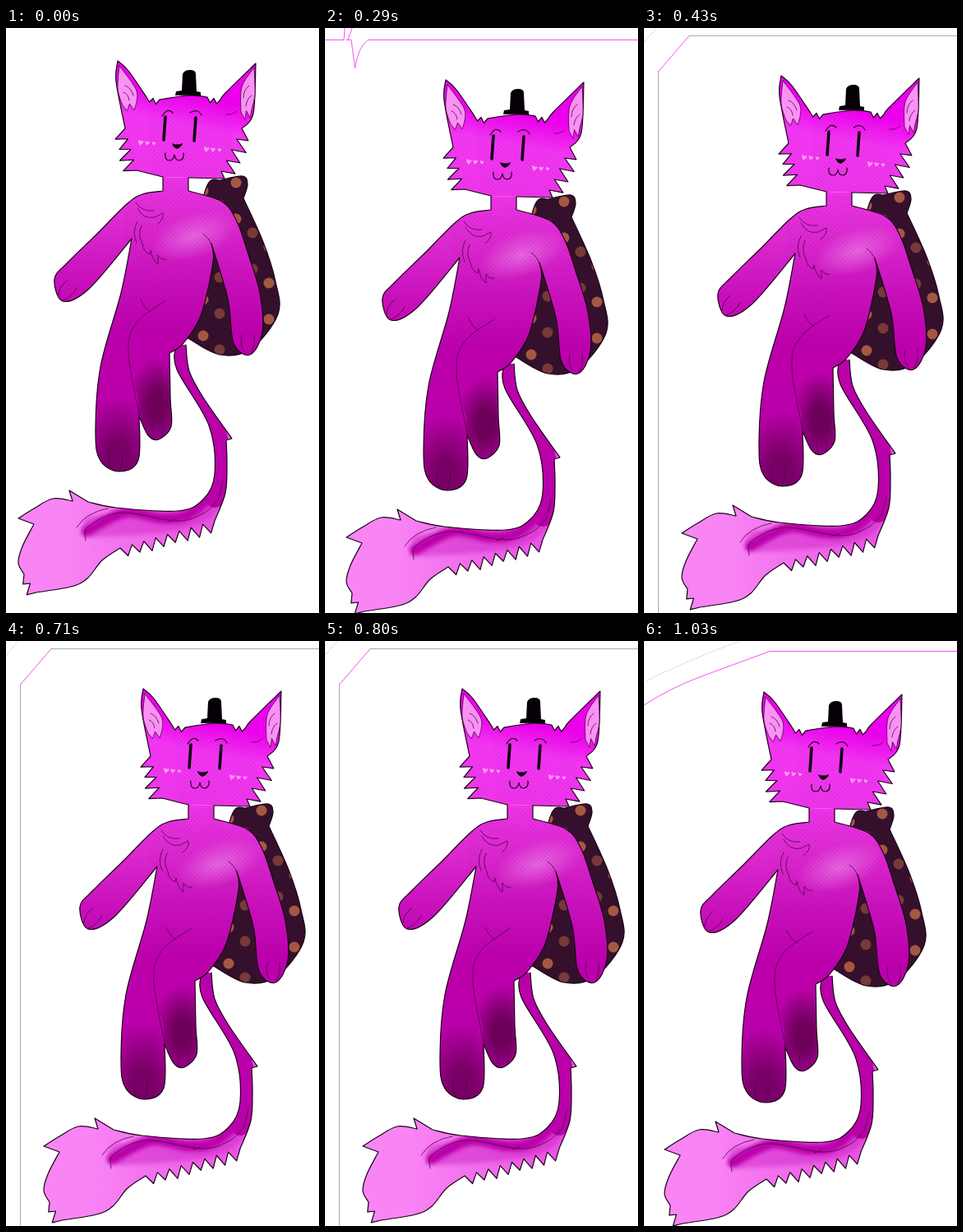
Recreate the animation shown at these times as an HTML page. Size 381x711 px, loop 1140 ms.

```html
<!DOCTYPE html>
<html lang="en">
<head>
<meta charset="utf-8">
<title>Floating cat</title>
<style>
  html, body { margin: 0; width: 100%; height: 100%; overflow: hidden; background: #fff; }
  svg { display: block; stroke-linecap: round; stroke-linejoin: round; }
  .ink { stroke: #180016; stroke-width: 1.2; }
  .thin { stroke: #4c0648; stroke-width: .8; }
  .wire { stroke: #f650f4; }
  .grey { stroke: #aaa; }
  .dots { stroke: #999; stroke-dasharray: 1 2; stroke-linecap: butt; }
</style>
</head>
<body>
<svg width="381" height="711" viewBox="0 0 381 711" fill="none">
  <defs>
    <linearGradient id="headFill" gradientUnits="userSpaceOnUse" x1="226" y1="72" x2="204" y2="183">
      <stop offset=".1" stop-color="#ed00ed"/><stop offset=".42" stop-color="#f136f2"/>
      <stop offset="1" stop-color="#ec35e8"/>
    </linearGradient>
    <linearGradient id="bodyFill" gradientUnits="userSpaceOnUse" x1="0" y1="180" x2="0" y2="400">
      <stop offset="0" stop-color="#ec35e8"/><stop offset=".25" stop-color="#dc2ad0"/>
      <stop offset=".55" stop-color="#c912bc"/><stop offset=".85" stop-color="#bb00ab"/>
    </linearGradient>
    <linearGradient id="tailFill" gradientUnits="userSpaceOnUse" x1="70" y1="0" x2="250" y2="0">
      <stop offset="0" stop-color="#f985f5"/><stop offset="1" stop-color="#ea55e3"/>
    </linearGradient>
    <radialGradient id="shade">
      <stop offset=".3" stop-color="#6c0058"/><stop offset="1" stop-color="#6c0058" stop-opacity="0"/>
    </radialGradient>
    <radialGradient id="glow">
      <stop offset="0" stop-color="#ec7ce6" stop-opacity=".75"/><stop offset="1" stop-color="#ec7ce6" stop-opacity="0"/>
    </radialGradient>
    <pattern id="halftone" width="4" height="4" patternUnits="userSpaceOnUse" patternTransform="rotate(40)">
      <circle cx="2" cy="2" r="1.1" fill="#a00098"/>
    </pattern>
    <filter id="soft" x="-20%" y="-60%" width="140%" height="220%"><feGaussianBlur stdDeviation="2.5"/></filter>

    <path id="bag" data-line="220,376 222,300 243,196 261,185|288,180 294,190 289,207|313,260 328,308 331,348 298,390 260,397 220,376"/>
    <path id="tail" data-line="207,385 208,415 247,483 254,542 240,573 209,587 134,583 100,576|77,562|81,575|57,572 34,584 15,596|34,603|20,630 15,650 22,664|^2,8 37,686|79,679 99,669 117,647 139,632|^8,10 254,599|267,565 269,530 268,501|275,499|240,449 223,417 219,385"/>
    <path id="body" data-line="191,181 191,198|166,202 147,214 110,251 75,285 59,305 69,332 101,317 153,256|140,322 115,412 109,492 115,526 138,539 161,525 162,472|173,495 186,500 201,484 200,450 199,395|215,384 237,350 252,285 250,262|270,329 277,383 297,397 312,370 309,322 294,272 281,235 263,211 222,198|222,182"/>
    <path id="head" data-line="222,182 266,183|262,174|^4,14 287,122|301,104 304,43|268,78 261,87|^2,-3 245,84|222,82 187,87|^2,-3 171,84|149,52 136,40|134,65 145,122|^4,13 159,173|191,181"/>
    <path id="toes" d="M-8 -22Q-11 -9 -5 -2M7 -22Q9 -9 3 0"/>
    <path id="heart" d="M0 4L-3 0Q-4 -3 -1 -2L0 -1L1 -2Q4 -3 3 0Z"/>
    <clipPath id="inBag"><use href="#bag"/></clipPath>
    <clipPath id="inTail"><use href="#tail"/></clipPath>
    <clipPath id="inBody"><use href="#body"/></clipPath>
    <clipPath id="inHead"><use href="#head"/></clipPath>
  </defs>

  <path class="wire" d="M0 14.500H23L24 0M33 0L28 14M26 14.500H32L36.500 49Q40 24 52 14.500H381"/>
  <g class="wire">
    <path class="grey" d="M381 9.500H55M17.500 53V711"/><path d="M55 9.500L17.500 53"/>
    <path class="dots" d="M0 17L15 0"/>
  </g>
  <g class="wire">
    <path d="M120 0L52 32L32.500 56V672M0 79L13 71"/><path class="dots" d="M4 48L47 28L72 0"/>
  </g>
  <g class="wire">
    <path d="M381 12.500H153L70 43Q32 57 0 78"/><path class="dots" d="M4 48Q50 25 117 0"/>
  </g>

  <g id="cat">
    <use href="#bag" fill="#35102c"/>
    <g id="coins" clip-path="url(#inBag)" fill="#a55840"></g>
    <use href="#bag" class="ink"/>

    <use href="#tail" fill="url(#tailFill)"/>
    <g clip-path="url(#inTail)">
      <path stroke="#ce20c5" stroke-width="26" opacity=".5" filter="url(#soft)" data-line="260,560 235,589 190,600 106,606"/>
      <path stroke="#ba00a9" stroke-width="12" filter="url(#soft)" data-line="262,556 225,590 190,596 145,589 98,612"/>
      <path stroke="#ba00a9" stroke-width="22" data-line="214,380 215,415 255,485 262,545 254,572"/>
    </g>
    <use href="#tail" class="ink"/>
    <g class="thin">
      <path data-line="97,623 100,606 140,589 207,599 240,590 259,573"/>
      <path d="M86 607Q97 589 124 584M197 600L206 597M258 574Q262 562 264 550"/>
    </g>

    <use href="#body" fill="url(#bodyFill)"/>
    <g clip-path="url(#inBody)">
      <ellipse cx="228" cy="253" rx="55" ry="27" fill="url(#glow)" transform="rotate(-18 228 253)"/>
      <ellipse cx="184" cy="458" rx="36" ry="58" fill="url(#shade)"/>
      <path d="M100 380V540H162L161 452L148 400Z" fill="url(#bodyFill)"/>
      <ellipse cx="136" cy="524" rx="50" ry="78" fill="url(#shade)" opacity=".85"/>
      <path d="M140 185H300V365H150ZM100 425H210V540H100Z" fill="url(#halftone)" opacity=".2"/>
    </g>
    <use href="#body" class="ink"/>
    <g class="thin">
      <path data-line="195,331 159,358 149,395 163,475"/>
      <path d="M164 330Q168 340 176 345M240 250Q247 255 250 263"/>
      <path d="M158 212Q165 224 180 222M160 219Q167 233 181 230L191 225Q193 232 184 239M160 235Q153 248 159 261M165 240Q160 252 166 262Q167 272 175 275L176 270Q178 282 185 287V276Q190 283 195 281"/>
      <use href="#toes" transform="translate(67 329) rotate(38)"/>
      <use href="#toes" transform="translate(134 538)"/>
      <use href="#toes" transform="translate(186 499) scale(.8)"/>
      <use href="#toes" transform="translate(295 395)"/>
    </g>

    <use href="#head" fill="url(#headFill)"/>
    <path d="M170 70H275V182H180Z" clip-path="url(#inHead)" fill="url(#halftone)" opacity=".16"/>
    <use href="#head" class="ink"/>
    <g class="thin">
      <path fill="#fb91f5" data-line="138,46 136,74 142,94|^2,6 159,90|158,74 138,46"/>
      <path fill="#fb91f5" data-line="302,48 287,72 286,102|^2,6 299,99|303,80 302,48"/>
      <path d="M145 70Q152 72 155 82M143 78Q149 80 150 88M296 70Q289 75 289 85M299 82Q293 86 292 95M268 105Q275 106 281 101"/>
    </g>

    <path d="M194 108L192 136M231 109L229 137" stroke="#100010" stroke-width="3.600"/>
    <path class="ink" d="M190 107Q197 96 203 103M224 103Q233 97 238 106M194 152Q193 161 199 161Q204 161 205 154Q206 161 211 161Q217 160 216 152"/>
    <path d="M202 140Q208 143 215 140Q214 145 208 147Q203 145 202 140Z" fill="#100010"/>
    <g id="blush" fill="#ff9bf4"></g>
    <path d="M207 77L214 76L215 56Q217 51 224 51Q231 51 231 56L232 77L237 78V83Q221 81 206 82Z" fill="#050005"/>
  </g>
</svg>
<script>
  const $ = id => document.getElementById(id);

  let seed = 7;
  const random = () => (seed = seed * 16807 % 2147483647) / 2147483647;

  // Zigzag of fur from a to b, its tips drooping a little.
  function fur([ax, ay], [bx, by], count, depth) {
    const dx = bx - ax, dy = by - ay, length = Math.hypot(dx, dy);
    let d = "";
    for (let i = 0; i < count; i++) {
      const tip = (i + .5) / count, end = (i + 1) / count, out = depth * (.75 + .5 * random()) / length;
      d += `L${ax + dx * tip - dy * out},${ay + dy * tip + dx * out + 3}L${ax + dx * end},${ay + dy * end}`;
    }
    return d;
  }

  function curve(pts) {
    let d = "";
    for (let i = 0; i < pts.length - 1; i++) {
      const a = pts[i], b = pts[i + 1], before = pts[i - 1] || a, after = pts[i + 2] || b;
      const c1 = a.map((v, k) => v + (b[k] - before[k]) / 6);
      const c2 = b.map((v, k) => v - (after[k] - a[k]) / 6);
      d += `C${c1} ${c2} ${b}`;
    }
    return d;
  }

  // Smooth runs meeting at corners "|"; "^count,depth x,y" runs along fur.
  function outline(text) {
    let last, d = "";
    for (const run of text.split("|")) {
      const pts = run.replace("^", "").split(" ").map(p => p.split(",").map(Number));
      if (!last) d = "M" + pts[0];
      d += run[0] === "^" ? fur(last, pts[1], ...pts[0]) : curve(last ? [last, ...pts] : pts);
      last = pts.at(-1);
    }
    return d;
  }
  for (const path of document.querySelectorAll("[data-line]"))
    path.setAttribute("d", outline(path.dataset.line));

  // Coins sit in staggered columns.
  for (let column = 0; column < 5; column++)
    for (let y = 176 + (22 + 17 * column) % 44; y < 400; y += 44)
      $("coins").innerHTML += `<circle cx="${240 + 20 * column}" cy="${y}" r="6.5" opacity="${column % 2 ? .6 : 1}"/>`;

  for (const [x, y] of [[164, 139], [244, 147]])
    for (let i = 0; i < 3; i++)
      $("blush").innerHTML += `<use href="#heart" transform="translate(${x + 8 * i} ${y + i / 2}) scale(${1 - .15 * i}) rotate(12)"/>`;

  // Each pose: end time, offset, visible wire.
  const poses = [
    [290, 0, 0], [430, 11, 23, 0], [570, 31, 18, 1],
    [710, 46, -17, 2], [860, 31, 18, 1], [1140, 10, 22, 3]
  ];
  const wires = document.querySelectorAll(".wire");

  function draw() {
    const t = performance.now() % 1140;
    const [, x, y, shown] = poses.find(([end]) => t < end);
    $("cat").setAttribute("transform", `translate(${x} ${y})`);
    wires.forEach((wire, i) => wire.style.display = i === shown ? "" : "none");
    requestAnimationFrame(draw);
  }
  draw();
</script>
</body>
</html>
```
